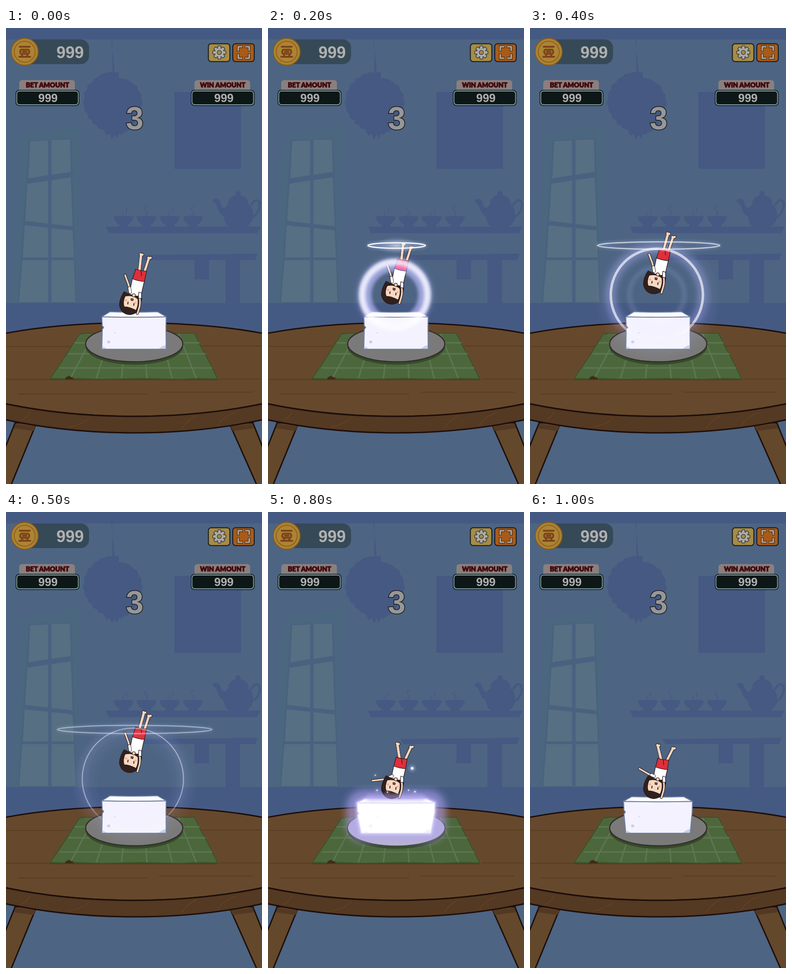
An HTML page for the animation above (1.1 s loop, 561 by 998 pixels).

```html
<!DOCTYPE html>
<html lang="en">
<head>
<meta charset="utf-8">
<title>Tofu jump</title>
<style>
  html, body { margin: 0; width: 100%; height: 100%; overflow: hidden; background: #4d6483; }
  svg { display: block; width: 100vw; height: 100vh; }
  .num { font: bold 36px "Liberation Sans", Arial, sans-serif; fill: #b0b0b0; text-anchor: middle; }
  .label { font: 900 14.3px Lato, sans-serif; fill: #420a0e; stroke: #420a0e; stroke-width: 1.1; stroke-linejoin: round; text-anchor: middle; }
  .ink { stroke: #1d0e0a; stroke-width: 3; stroke-linejoin: round; }
  .light { mix-blend-mode: screen; }
</style>
</head>
<body>
<svg viewBox="0 0 561 998" preserveAspectRatio="none">
  <defs>
    <filter id="soft" x="-50%" y="-50%" width="200%" height="200%"><feGaussianBlur stdDeviation="3"/></filter>
    <filter id="glow" x="-50%" y="-50%" width="200%" height="200%"><feGaussianBlur stdDeviation="8"/></filter>
    <linearGradient id="fade" x1="0" y1="640" x2="0" y2="690" gradientUnits="userSpaceOnUse">
      <stop stop-color="#fff"/><stop offset="1" stop-color="#000"/>
    </linearGradient>
    <mask id="low" maskUnits="userSpaceOnUse" x="0" y="0" width="561" height="998"><path fill="url(#fade)" d="M0 0H561V998H0z"/></mask>
    <radialGradient id="flash"><stop stop-color="#fff"/><stop offset=".35" stop-color="#dce4ff" stop-opacity=".6"/><stop offset="1" stop-color="#aab8ff" stop-opacity="0"/></radialGradient>
    <radialGradient id="haze"><stop offset=".55" stop-color="#7a78c8" stop-opacity="0"/><stop offset=".8" stop-color="#7a78c8" stop-opacity=".12"/><stop offset="1" stop-color="#7a78c8" stop-opacity="0"/></radialGradient>
  </defs>

  <!-- room -->
  <path fill="#4d6483" d="M0 0H561V998H0z"/>
  <path fill="#455a83" d="M0 0H561V25H0zM0 602H561V700H0z"/>
  <path fill="#4b667f" d="M35 235 160 212 158 602 12 602z"/>
  <path fill="#4a6280" d="M50 246 143 241 154 602 26 602z"/>
  <g fill="#576f82">
    <path d="M53 248 92 246V322L49 329zM100 245 140 244 142 315 100 321zM47 341 92 334V428L42 422zM100 333 142 327 146 434 100 429z"/>
    <path d="M41 432 92 437V502H37zM100 438 146 443 149 502H100zM36 508H92V600H29zM100 508H149L152 600H100z"/>
  </g>
  <g fill="#455982">
    <path d="M231 25h2v72h14v12q22 2 33 15l7 3 2 9 8 10-1 9 4 11-4 9 2 9-6 8-1 9-9 6-2 8-9 4-4 7-8 2-6 6-5-3-5 12-5-10-6 11-4-12-8 4-6-13-12-4-2-6-9-3-2-8-9-5-1-9-7-6v-10l-4-8 4-10-1-11 7-9 1-9 9-5 5-9 10-4 4-5 17-5V97h14z"/>
    <path d="M369 140H515V308H369zM219 435H558L550 449H226zM290 497 551 494 546 508H297zM413 508H445V550H413zM481 508H513V602H481z"/>
    <g id="cups" stroke="#455982" stroke-width="0"></g>
    <path d="M478 402C481 373 536 370 541 402C545 424 532 430 528 435H489C479 428 476 415 478 402zM481 414C460 406 469 388 453 380C451 373 466 371 469 379C471 392 477 397 486 390zM486 384Q490 369 503 366V360Q508 354 514 360V366Q528 368 532 384z"/>
    <path fill="none" stroke="#455982" stroke-width="4.5" d="M537 389C543 372 559 374 556 390C554 403 547 411 538 415"/>
  </g>

  <!-- table -->
  <g class="ink" fill="#64482b">
    <path d="M20 864-20 964V1010H7L67 864z"/><path d="M541 864 581 964V1010H554L489 864z"/>
    <path fill="#533823" stroke="none" d="M21 866 65 872 60 882 17 876zM540 866 492 872 497 882 544 876z"/>
    <path fill="#66492c" d="M-3 668.500A446 102.500 0 0 1 564 668.500V822Q430 850 281 850Q130 850-3 822z"/>
    <path fill="#543923" d="M-3 822Q130 850 281 850Q430 850 564 822V857Q430 886 281 886Q130 886-3 857z"/>
  </g>
  <g fill="none" stroke="#573b21" stroke-width="1.6">
    <path d="M0 697H148M428 696H561M0 769H97M468 768H561M26 801H310M335 797H540"/>
    <path stroke="#6a4221" d="M138 873Q165 869 183 853M386 876Q400 856 417 849M463 872Q474 850 502 842M33 859Q44 855 53 840"/>
  </g>

  <!-- mat and plate -->
  <path fill="#2c2b17" opacity=".35" d="M95 771H466L413 670H161z"/>
  <path fill="#4d673d" stroke="#3a5129" stroke-width="2" stroke-linejoin="round" d="M162 668 166 670 171 668H413L421 684 426 695 440 720 464 768 420 767 380 769 300 767 210 769 149 767Q137 756 129 768L97 767 128 721z"/>
  <path fill="none" stroke="#5d7752" stroke-width="3" d="M150 689H424M137 713H437M118 744H452M193 669 141 767M229 669 198 767M264 669 253 767M302 669 309 767M340 669 364 767M378 669 417 767"/>
  <path fill="#3f2a19" d="M149 769Q137 756 129 769z"/>
  <ellipse cx="281" cy="697" rx="107" ry="40" fill="#344b2a"/>
  <ellipse cx="281" cy="691.500" rx="106.500" ry="39" fill="#7a7a7a" stroke="#352b2b" stroke-width="2.500"/>

  <!-- counters -->
  <rect x="30" y="25" width="152" height="54" rx="18" fill="#364956"/>
  <circle cx="41" cy="52" r="29.500" fill="#ac832f" stroke="#86591f" stroke-width="2"/>
  <circle cx="41" cy="52" r="23" fill="#ab8434" stroke="#8e611f" stroke-width="2"/>
  <path fill="none" stroke="#7d431a" stroke-width="4" stroke-linecap="round" stroke-linejoin="round" d="M30 41H52M33 47.500H49Q53 52 49 56.500H33Q29 52 33 47.500zM37 52H45M29 63H53M35 59 36 62M47 59 46 62"/>
  <text class="num" x="140.500" y="66">999</text>
  <g stroke="#15191e" stroke-width="2">
    <rect x="443.500" y="34.500" width="47" height="39" rx="6" fill="#a68c45"/>
    <rect x="497" y="34.500" width="47" height="39" rx="6" fill="#a85b18"/>
  </g>
  <g id="gear" stroke="#3c3a32" stroke-width="1.500"></g>
  <path fill="none" stroke="#4a2d16" stroke-width="6" d="M509 51V41H519M523 41H533V51M533 56V66H523M519 66H509V56"/>
  <path fill="none" stroke="#b3aba2" stroke-width="3.200" d="M509 50V41H518M524 41H533V50M533 57V66H524M518 66H509V57"/>
  <g id="panels"></g>
  <text class="num" x="282" y="221.500" style="font-size:70px;fill:#979797;stroke:#191919;stroke-width:3;paint-order:stroke">3</text>

  <g id="scene"></g>
</svg>
<script>
const el = id => document.getElementById(id);
const range = n => [...Array(n).keys()];

el('cups').innerHTML = [258, 308, 359, 410].map((x, i) => `
  <path d="M${x - 22} 413Q${x} 409 ${x + 22} 413Q${x + 18} 427 ${x + 9} 430L${x + 11} 435H${x - 11}L${x - 9} 430Q${x - 19} 427 ${x - 22} 413"/>
  <path fill="none" stroke-width="1.3" d="${i % 2
    ? `M${x - 3} 410q9-5 2-10t2-10`
    : `M${x - 1} 409q-3-4 0-8M${x + 7} 404q-3-5 0-11`}"/>`).join('');

el('gear').innerHTML = range(8).map(i =>
  `<rect x="464" y="39" width="7" height="8" rx="2" fill="#ababa9" transform="rotate(${i * 45} 467.5 53.5)"/>`).join('') +
  '<circle cx="467.5" cy="53.5" r="9.5" fill="#ababa9" stroke="none"/><circle cx="467.5" cy="53.5" r="4.5" fill="#a68c45"/>';

el('panels').innerHTML = [['BET AMOUNT', 21], ['WIN AMOUNT', 405]].map(([label, x]) => `
  <path fill="#8a7f7f" d="M${x + 8} 137V121q0-7 7-7H${x + 123}q7 0 7 7V137z"/>
  <rect x="${x}" y="135.5" width="140" height="35" rx="8" fill="#0f1718"/>
  <rect x="${x + 2.5}" y="138" width="135" height="30" rx="6" fill="#0e1718" stroke="#7f9e9d" stroke-width="2"/>
  <text class="label" x="${x + 70}" y="130">${label}</text>
  <text class="num" x="${x + (x < 100 ? 71 : 72.5)}" y="161.5" style="font-size:25.5px">999</text>`).join('');

const line = (d, width, color, extra = '') =>
  `<path fill="none" stroke-linecap="round" stroke-linejoin="round" d="${d}" stroke="${color}" stroke-width="${width}" ${extra}/>`;
const limb = (d, width = 5) => line(d, width + 2, '#241716') + line(d, width, '#f6d5bd');

// squash: 0 straight, 1 landed; lean: feet drawn together in the air
function girl(lift, squash, lean, arm) {
  const at = (x, y, dx, dy) => `${x + dx * squash} ${y + dy * squash}`;
  const footL = at(296 + lean, 497, -16, 15), footR = at(313, 504, 0, 14);
  const hip = (x, y) => at(x, y, -4, 11), waist = (x, y) => at(x, y, -2, 9);
  const sleeve = `M272 578L${(273 + arm[0]) / 2} ${(578 + arm[1]) / 2}`;
  return `<g transform="translate(0 ${-lift})" stroke="#241716" stroke-width="1.2" stroke-linejoin="round">
    ${limb(`M${hip(292, 534)}L${footL}l-1-2M${footL}l3-1`)}
    ${limb(`M${hip(303, 535)}L${footR}l-1-1M${footR}l4-1`)}
    ${line(`M${hip(292, 534)}L${footL}`, 5, '#f6d5bd')}
    <path fill="#df2f3b" d="M${hip(284, 528)}L${hip(296, 531)} ${hip(308, 532)} ${waist(303, 556)} ${waist(277, 550)}z"/>
    <path fill="none" d="M${hip(296, 531)}l1 12"/>
    ${limb(`M273 579L${arm[0]} ${arm[1]} ${arm[2]} ${arm[3]}`, 3.6)}
    <path fill="#fff" d="M${waist(277, 549)}Q${waist(290, 554)} ${waist(303, 555)}Q298 575 296 587L288 590 275 587 270 583z"/>
    ${line(sleeve, 7, '#241716')}${line(sleeve, 5.2, '#fff')}
    <path fill="#30211f" d="M259 577Q247 595 249 609Q254 627 272 627.5Q294 625 295 602Q298 598 297 587Q278 588 259 577z"/>
    <path fill="#f8d9c2" d="M261 587Q255 600 259 610Q270 610 285 618Q291 606 289 593Q277 583 261 587z"/>
    <circle cx="280" cy="585" r="3.500" fill="#f6d5bd"/>
    <g stroke="none"><circle cx="263" cy="596" r="2.500" fill="#f3ad9b"/><circle cx="284" cy="601" r="2.300" fill="#f3ad9b"/></g>
    ${line('M267.500 600l-.5 4M280.500 603l-.5 4', 2, '#241716')}
    <path fill="#c4453c" d="M274 592l5 1-1 4-4-1z"/>
    ${limb('M293 590Q295 604 291 615L288 625', 3.6)}
    <path fill="#fff" d="M291 578 297 580 297 592 290 591z"/>
  </g>`;
}

function block(drop, top, base, glow) {
  const x = 280.5, y = 632 + drop * .6, l = x - top, r = x + top, bl = x - base, br = x + base;
  const front = `M${l} ${y}Q${x} ${y + 2} ${r} ${y}L${r - .5} ${y + 22} ${br} 703H${bl}L${l + 1} ${y + 28}l3-5-3-3z`;
  const lid = `M${l} ${y}L${l + 18} ${621 + drop}Q${x} ${623 + drop} ${r - 19} ${621 + drop}L${r} ${y}Q${x} ${y + 2} ${l} ${y}z`;
  const edge = glow ? '#e2ddfc' : '#6f7fa3';
  const halo = glow ? `
    <ellipse cx="281" cy="691.500" rx="106" ry="39" fill="#e2dfff" opacity="${glow * .6}"/>
    <rect x="${l - 24 * glow}" y="${626 - 18 * glow}" width="${2 * top + 48 * glow}" height="${84 + 30 * glow}" rx="38" fill="#b1a3f4" opacity="${.3 + .3 * glow}" filter="url(#glow)"/>
    <path d="${front}${lid}" fill="#fff" stroke="#d9d1ff" stroke-width="${7 * glow}" stroke-linejoin="round" filter="url(#soft)" opacity=".8"/>` : '';
  return `${halo}<g stroke="${edge}" stroke-width="2" stroke-linejoin="round">
    <path fill="${glow ? '#fff' : '#f3f2fe'}" d="${front}"/><path fill="#fdfdff" d="${lid}"/></g>
    <g fill="#c9cfe3" opacity="${1 - .75 * glow}"><ellipse cx="225" cy="687" rx="3.500" ry="3"/><circle cx="239" cy="667" r="1.200"/>
    <path d="M${br - 1} 690V702H${br - 16}Q${br - 8} 695 ${br - 1} 694zM212 697l9 5h-9z"/></g>`;
}

const circle = (r, width, color, opacity, blur = '') =>
  `<circle cx="278" cy="584" r="${r}" fill="none" stroke="${color}" stroke-width="${width}" opacity="${opacity}" ${blur && `filter="url(#${blur})"`}/>`;

const radius = [0, 48, 70, 88, 101, 111];
const strength = [0, .7, 1, 1, .65, .42];

// light behind the girl
function aura(i) {
  const echo = i == 3 ? circle(32, 11, '#8e94dc', .4, 'soft') : i == 4 ? circle(60, 12, '#8e94dc', .15, 'soft') : '';
  const haze = i > 3 ? '<circle cx="281" cy="591" r="139" fill="url(#haze)"/>' : '';
  return `<g class="light">${haze}<g mask="url(#low)">
    ${circle(radius[i], 16, '#8d80f5', i < 5 ? strength[i] * .75 : .08, 'glow')}${echo}</g></g>`;
}

function rings(i) {
  const r = radius[i], power = strength[i], rx = 63 + 35.5 * (i - 2), ry = 4 + i;
  const wave = i < 3
    ? circle(r - 7, 24, '#9288ee', .6, 'soft') + circle(r + 2, 14, '#e9e6ff', .85, 'soft')
    : circle(r, 17.5 - i * 3, '#fff', power);
  const flash = i < 4
    ? `<ellipse cx="282" cy="476" rx="${i < 3 ? 48 : 60}" ry="${i < 3 ? 19 : 14}" fill="url(#flash)" opacity="${1.2 - .3 * i}"/>` : '';
  return `<g class="light"><g mask="url(#low)">${wave}</g>${flash}
    <ellipse cx="282" cy="476" rx="${rx}" ry="${ry}" fill="none" stroke="#a9b0ff" stroke-width="6" opacity="${power * .4}" filter="url(#soft)"/>
    <ellipse cx="282" cy="476" rx="${rx}" ry="${ry}" fill="none" stroke="#fff" stroke-width="2.5" opacity="${power}"/></g>`;
}

const sparks = {
  7: [[303, 606, 4], [323, 585, 1.3], [338, 616, 1.6], [238, 601, 1.5], [249, 606, 1.5], [312, 618, 1.3]],
  8: [[316, 561, 3], [235, 576, 1.3], [322, 612, 1.7], [308, 609, 1.4], [239, 609, 1.6], [262, 613, 1.5]],
  9: [[326, 540, 1.6], [236, 560, 1], [328, 603, 1]]
};
const sparkle = ([x, y, r]) =>
  `<circle cx="${x}" cy="${y}" r="${r * 2}" fill="#c9ccff" opacity=".6" filter="url(#soft)"/><circle cx="${x}" cy="${y}" r="${r}" fill="#fff" opacity=".9"/>`;

const standing = { squash: 0, arm: [268, 560, 261, 541], block: [0, 70.5, 70.5, 0] };
const landing = {
  7: { squash: .5, arm: [259, 568, 240, 557], block: [6, 77, 72, .5] },
  8: { squash: .78, arm: [255, 585, 229, 588], block: [7, 85, 76, 1] },
  9: { squash: .92, arm: [256, 578, 232, 573], block: [4, 80, 73, .3] },
  10: { squash: 1, arm: [259, 573, 240, 562], block: [2, 75.5, 70.5, 0] }
};

function draw(i) {
  const pose = landing[i] || standing;
  const lift = i < 6 ? 11.4 * i : i == 6 ? 28 : 0;
  const lean = i > 2 && i < 7 ? 6 : 0;
  const ringing = i > 0 && i < 6, glow = pose.block[3];
  const rim = glow ? `<rect x="215" y="617" width="130" height="16" rx="8" fill="#b9adf6" opacity="${glow * .5}" filter="url(#soft)"/>` : '';
  el('scene').innerHTML = block(...pose.block) + (ringing ? aura(i) : '') +
    girl(lift, pose.squash, lean, pose.arm) + rim +
    (ringing ? rings(i) : '') + (sparks[i] || []).map(sparkle).join('');
}

let shown = -1;
const start = performance.now();
function tick() {
  const step = Math.floor((performance.now() - start) % 1100 / 100);
  if (step != shown) draw(shown = step);
  requestAnimationFrame(tick);
}
tick();
</script>
</body>
</html>
```
